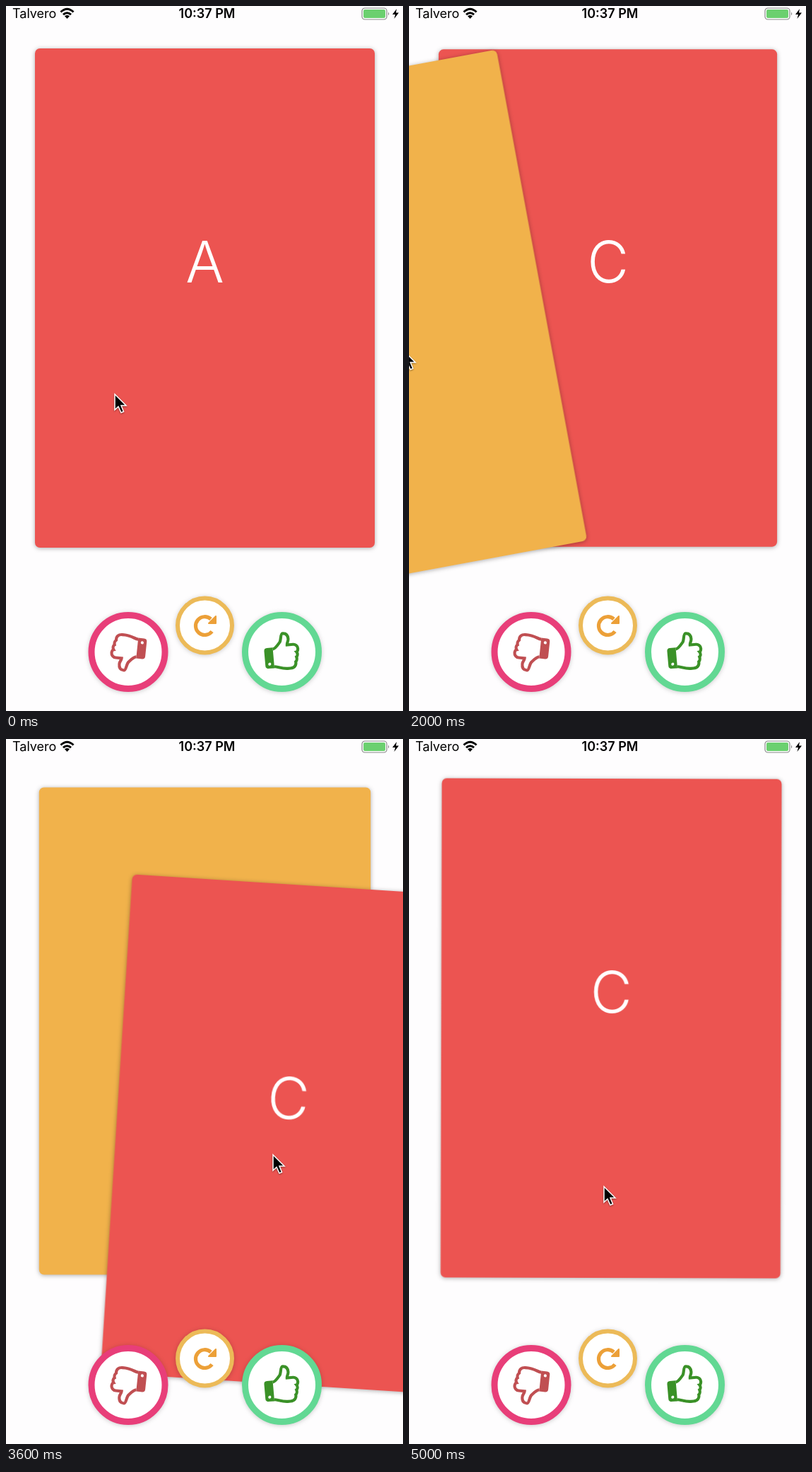
Recreate the animation shown at these times as an HTML page. Size 562 by 997 pixels, loop 5100 ms.

```html
<!DOCTYPE html>
<html lang="en">
<head>
<meta charset="utf-8">
<title>Card swiper</title>
<style>
  html, body { margin: 0; width: 100%; height: 100%; overflow: hidden; background: #fefdfe; }
  svg { display: block; width: 562px; height: 997px; font-family: Inter, Roboto, sans-serif; }
  .card { filter: drop-shadow(0 1px 3px rgba(0, 0, 0, .32)); }
  .card text { font-size: 81px; font-weight: 350; fill: #fff; text-anchor: middle; }
  .button { fill: #fff; filter: drop-shadow(0 1px 3px rgba(0, 0, 0, .2)); }
  .status { font-size: 18px; }
  #cursor { filter: drop-shadow(0 1px 1px rgba(0, 0, 0, .4)); }
</style>
</head>
<body>
<svg viewBox="0 0 562 997">
  <defs>
    <g id="thumb" transform="scale(.0325) translate(-896 -832)">
      <path d="M512 704C640 690 780 490 830 440C910 350 890 64 992 64C1150 64 1216 170 1216 320C1216 430 1144 480 1144 576H1408C1500 576 1600 660 1600 768C1600 850 1560 910 1530 915C1590 1000 1560 1100 1510 1130C1540 1220 1500 1310 1460 1340C1480 1500 1380 1600 1209 1600H1088C860 1600 620 1472 512 1472"
        fill="none" stroke="currentColor" stroke-width="128"/>
      <path d="M512 640H256Q128 640 128 768V1408Q128 1536 256 1536H512Z" fill="currentColor"/>
      <circle cx="320" cy="1344" r="64" fill="#fff"/>
    </g>
  </defs>

  <g class="status">
    <text x="9" y="17">Talvero</text>
    <text x="284.5" y="17" text-anchor="middle" font-weight="600">10:37 PM</text>
    <path d="M77.5 8.5Q86.5 0 95.5 8.5M81 12.2Q86.5 7.2 92 12.2" fill="none" stroke="#000" stroke-width="3"/>
    <path d="M83 14.3Q86.5 11.5 90 14.3L86.5 18Z"/>
    <rect x="504" y="3" width="35" height="16" rx="4" fill="#fff" stroke="#888" stroke-width="1.2"/>
    <rect x="506" y="5" width="31" height="12" rx="2" fill="#6bd06f"/>
    <path d="M541 8.5Q543.5 11 541 13.5Z" fill="#888"/>
    <path d="M553 4L547 12H551L549.5 18L556 9.5H552Z"/>
  </g>

  <g id="deck"></g>

  <circle class="button" cx="173" cy="913.5" r="52" stroke="#e83e79" stroke-width="9"/>
  <circle class="button" cx="281.5" cy="876" r="38.5" stroke="#ecba58" stroke-width="6"/>
  <circle class="button" cx="390.5" cy="913.5" r="52" stroke="#62d893" stroke-width="9"/>
  <use href="#thumb" transform="translate(172.5 915) rotate(186)" color="#c04f52"/>
  <use href="#thumb" transform="translate(390.5 912.5) rotate(-5)" color="#3a9127"/>
  <g stroke="#eca038" stroke-linejoin="round">
    <path d="M291.6 884.5A12.9 12.9 0 1 1 290 867" fill="none" stroke-width="5.2"/>
    <path d="M297 863V873H287Z" fill="#eca038" stroke-width="2"/>
  </g>

  <path id="cursor" d="M1 2V24L6 19.500L10 28L13.500 26.500L10 18H17Z" stroke="#fff" stroke-width="1.5"/>
</svg>
<script>
const LOOP = 5100, STEP = 100;
const RED = '#ec5451', YELLOW = '#f1b24b';

const clamp = p => Math.max(0, Math.min(1, p));
const smooth = p => p * p * (3 - 2 * p);

// Share of the way covered: a swipe speeds up and leaves the stage.
const swipe = (t, start) => Math.max(0, (t - start) / 500) ** 1.5;

// A tug is dragged out, then released into a damped spring.
function tug(t, start, drag, release) {
  const s = t - release;
  if (s < 0) return smooth(clamp((t - start) / drag));
  return Math.exp(-s / 120) * Math.cos(Math.PI * s / 400);
}

const scaled = (x, y, p) => [x * p, y * p];

const cards = [
  { letter: 'A', color: RED, offset: t => scaled(356, 100, swipe(t, 500)) },
  { letter: 'B', color: YELLOW, offset: t => scaled(-330, 39.5, swipe(t, 1500)) },
  { letter: 'C', color: RED, offset: t => t < 4200
    ? scaled(115, 146, tug(t, 3000, 600, 3700))
    : scaled(-130, 110, tug(t, 4200, 400, 4600)) },
  { letter: 'D', color: YELLOW, offset: () => [0, 0] }
];

// Turning points of the pointer: time, x, y.
const stops = [[0, 153, 547], [500, 220, 535], [1000, 480, 595], [2000, -8, 486],
  [3100, 302, 494], [3600, 377, 586], [4200, 339, 527], [4600, 245, 610], [5000, 275, 631]];

function pointer(t) {
  const i = stops.findIndex(stop => stop[0] > t);
  if (i < 0) return stops[stops.length - 1].slice(1);
  const [t0, x0, y0] = stops[i - 1], [t1, x1, y1] = stops[i];
  const p = smooth((t - t0) / (t1 - t0));
  return [x0 + (x1 - x0) * p, y0 + (y1 - y0) * p];
}

const deck = document.getElementById('deck');
const cursor = document.getElementById('cursor');

for (const card of cards) {
  deck.insertAdjacentHTML('afterbegin', `<g class="card">
    <rect x="-240.5" y="-353" width="481" height="706" rx="7" fill="${card.color}"/>
    <text y="-22.5">${card.letter}</text></g>`);
  card.node = deck.firstElementChild;
}

function draw(now) {
  const t = Math.floor(now % LOOP / STEP) * STEP;
  let distance = Infinity;
  for (const { offset, node } of cards) {
    const [x, y] = offset(t);
    // A waiting card grows as the one above it is dragged away.
    const scale = 0.95 + 0.05 * clamp(distance / 360);
    node.setAttribute('transform',
      `translate(${281.5 + x} ${413 + y}) rotate(${x * 0.0318}) scale(${scale})`);
    distance = Math.hypot(x, y);
  }
  cursor.setAttribute('transform', `translate(${pointer(t)})`);
  requestAnimationFrame(draw);
}
requestAnimationFrame(draw);
</script>
</body>
</html>
```
